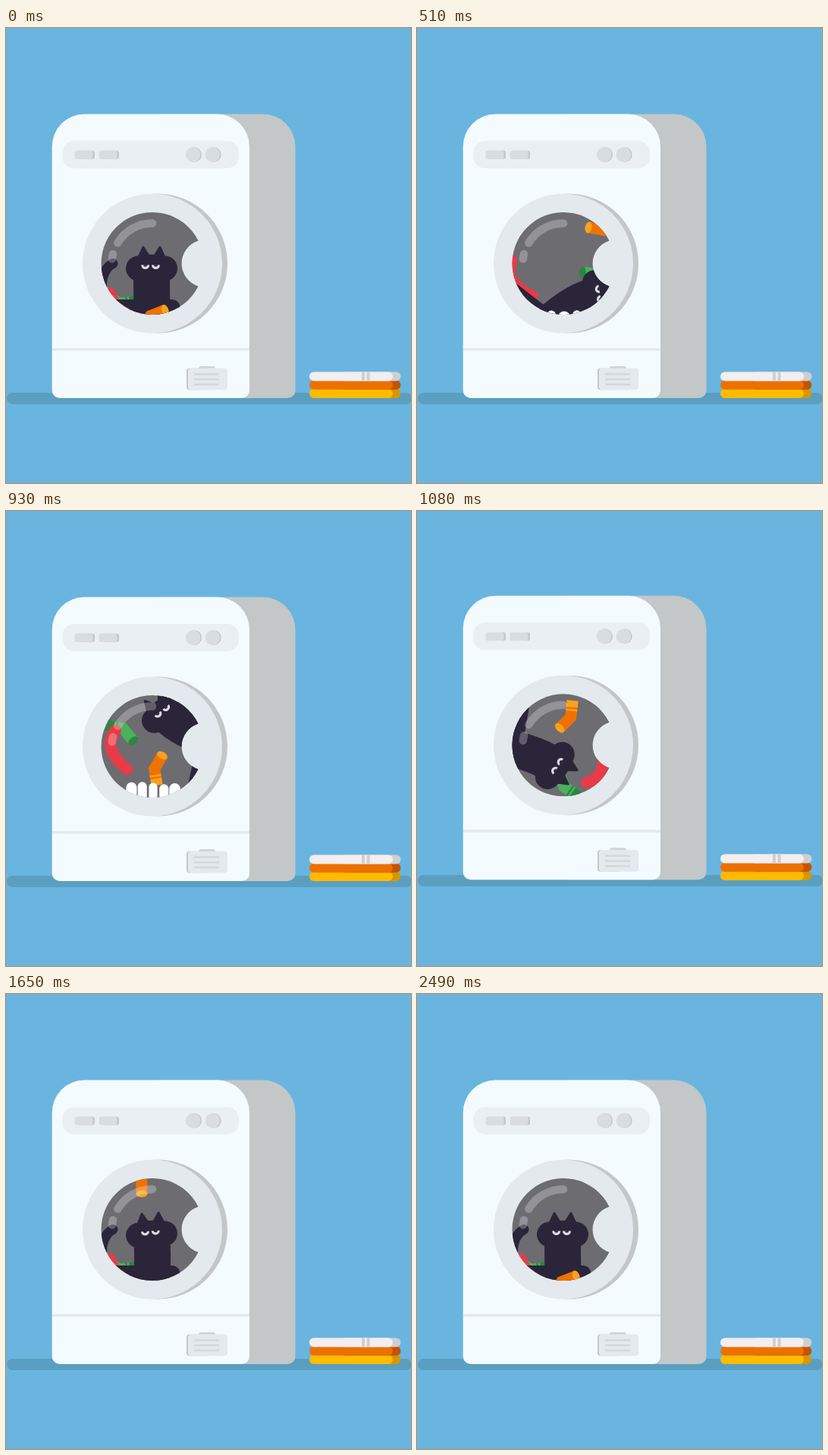
These frames come from a looping animation (534 px wide and 600 px high, 2.52 s). An HTML page:

```html
<!DOCTYPE html>
<html lang="en">
<head>
<meta charset="utf-8">
<title>Laundry day</title>
<style>
  html, body { margin: 0; width: 100%; height: 100%; overflow: hidden; background: #69b5e0; }
  svg { display: block; width: 100vw; height: 100vh; }
  .side { fill: #c4c7c8; }
  .ring { fill: #e4e9ed; }
  .knob { fill: #d9dddf; }
  .cat { fill: #2b253a; }
  .line { fill: none; stroke: #2b253a; }
  .shine { fill: none; stroke: #fff; stroke-opacity: .26; stroke-width: 10.5; stroke-linecap: round; }
</style>
</head>
<body>
<svg viewBox="0 0 534 600" preserveAspectRatio="xMidYMid meet">
  <defs>
    <clipPath id="glass">
      <path d="M253.5 280.5A67.5 67.5 0 1 0 253.5 340.5A31.5 31.5 0 0 1 253.5 280.5Z"/>
    </clipPath>
    <g id="button">
      <rect class="side" x="2" width="24.5" height="11" rx="3"/>
      <rect class="knob" width="24" height="11" rx="3"/>
    </g>
    <g id="dial">
      <circle class="side" cx="1.2" r="9.8"/>
      <circle class="knob" cx="-.3" r="9.8"/>
    </g>
    <g id="eye">
      <path fill="#dcdce4" d="M-5.5 0A5.5 5.5 0 0 0 5.5 0Z"/>
      <path class="cat" d="M-2.5 -.3A2.5 2.5 0 0 0 2.5 -.3Z"/>
    </g>
  </defs>

  <rect id="floor" x="1" y="481" width="534" height="15" rx="7.5" fill="#5a9fc0"/>

  <g id="machine">
    <path class="side" d="M200 113.5H338.5A43 43 0 0 1 381.5 156.5V478A10 10 0 0 1 371.5 488H200Z"/>
    <path fill="#f3fbff" d="M60.7 156.5A43 43 0 0 1 103.7 113.5H278A43 43 0 0 1 321 156.5V478A10 10 0 0 1 311 488H70.7A10 10 0 0 1 60.7 478Z"/>
    <rect x="74.5" y="149" width="232.5" height="36" rx="15" fill="#e9eff2"/>
    <use href="#button" x="90.5" y="161.7"/>
    <use href="#button" x="122.5" y="161.7"/>
    <use href="#dial" x="247" y="167"/>
    <use href="#dial" x="272.7" y="167"/>
    <rect class="ring" x="61" y="422" width="260" height="3.5"/>

    <rect x="254" y="446" width="22" height="8" rx="3" fill="#d0d4d6"/>
    <rect class="side" x="238" y="448.7" width="30" height="28.6" rx="4"/>
    <rect class="ring" x="240" y="448.7" width="52" height="28.6" rx="4"/>
    <path d="M248 456.5H281M248 463.3H281M248 470H281" stroke="#d3d8db" stroke-width="2.4"/>

    <circle class="side" cx="200" cy="310.5" r="92"/>
    <circle class="ring" cx="193" cy="310.5" r="92"/>

    <g clip-path="url(#glass)">
      <rect x="120" y="238" width="140" height="145" fill="#6d6c71"/>
      <g id="green"></g>
      <path id="red" d="M9 -24Q-13 -2.5 17 29" fill="none" stroke="#e93a48" stroke-width="15" stroke-linecap="round"/>
      <g id="cat">
        <path id="tail" class="line" stroke-width="13" stroke-linecap="round" d="M-65 44C-69 24 -65 7 -52 0"/>
        <path id="neck" class="line" stroke-width="48"/>
        <path id="base" class="cat" d="M-85 47.5H26A10.5 10.5 0 0 1 36.5 58V82H-85Z"/>
        <g id="head">
          <path class="cat" d="M-19 -14L-12.3 -28.5Q-11 -30.5 -9.7 -28.5L-2.5 -17H2.5L9.7 -28.5Q11 -30.5 12.3 -28.5L19 -14Z"/>
          <rect class="cat" x="-18" y="-18.3" width="36" height="35" rx="3"/>
          <circle class="cat" cx="-17.5" r="16.5"/>
          <circle class="cat" cx="17.5" r="16.5"/>
          <use href="#eye" x="-8.3" y="-4.5"/>
          <use href="#eye" x="5.5" y="-4.5"/>
        </g>
      </g>
      <g id="orange"></g>
      <g id="foam" stroke="#fff" stroke-linecap="round"></g>
      <path class="shine" d="M147.3 283.5A53 53 0 0 1 193 257.5"/>
      <path class="shine" d="M141 298A53 53 0 0 0 139.8 304.5"/>
    </g>
  </g>

  <g id="towels"></g>
</svg>

<script>
const CX = 193, CY = 310.5, LOOP = 2520, STEP = 30, SPIN = 1650, RAD = Math.PI / 180;
const $ = id => document.getElementById(id);
const place = (id, x, y, r = 0) => $(id).setAttribute('transform', `translate(${x} ${y}) rotate(${r})`);

// Drum progress: brisk start, long slow-down
function spin(t) {
  const u = Math.min(t / SPIN, 1), a = u ** 1.45;
  return a / (a + (1 - u) ** 2);
}
// Half sine from a to b, zero outside
const wave = (t, a, b) => t > a && t < b ? Math.sin(Math.PI * (t - a) / (b - a)) : 0;
const smooth = (t, a, b) => {
  const u = Math.min(Math.max((t - a) / (b - a), 0), 1);
  return u * u * (3 - 2 * u);
};
const mix = (a, b, k) => a.map((v, i) => v + (b[i] - v) * k);

// Laundry follows the drum, lags behind it and drops towards the middle
const laundry = {
  red: { angle: 124, sweep: 1440, radius: 71, lag: 230, from: 570, dip: 17, dipFrom: 570, face: -184, roll: 0, swing: 0 },
  green: { angle: 129, sweep: 1440, radius: 68, lag: 220, from: 260, dip: 28, dipFrom: 260, face: 132, roll: 0, swing: 130 },
  orange: { angle: 92, sweep: 1246, radius: 69, lag: 170, from: 260, dip: 40, dipFrom: 690, face: -62, roll: -56, swing: 0 }
};

function pose(o, t) {
  const late = wave(t, o.from, 1310);
  const a = o.angle + o.sweep * spin(t) - o.lag * late;
  const r = o.radius - o.dip * wave(t, o.dipFrom, 1230);
  const turn = a + o.face + o.roll * Math.min(t / SPIN, 1) + o.swing * late;
  return [CX + r * Math.cos(a * RAD), CY + r * Math.sin(a * RAD), turn];
}

// After the spin the orange sock lands on the head, then slides off
function orangePose(t) {
  if (t < SPIN) return pose(laundry.orange, t);
  const [x, y, turn] = pose(laundry.orange, 0);
  const landed = mix(pose(laundry.orange, SPIN), [181, 298, 1310], smooth(t, SPIN, 1830));
  return mix(landed, [x, y, turn + 1440], smooth(t, 2160, 2460));
}

function cat(t) {
  const slide = wave(t, 0, 1270), x = 65 * slide - 1, y = 6.5, out = 12 * slide;
  const tilt = 50 * wave(t, 150, 1250) - 4 * wave(t, 1400, 1900);
  place('cat', CX, CY, 1440 * spin(t));
  place('base', 0, out);
  place('head', x, y, tilt);
  $('tail').setAttribute('transform', `rotate(${-70 * Math.min(1, 3 * wave(t, 0, SPIN))} -65 44)`);
  const cx = x - 28 * Math.sin(tilt * RAD), cy = y + 28 * Math.cos(tilt * RAD);
  $('neck').setAttribute('d', `M${x} ${y}Q${cx} ${cy} ${x * .55} ${64 + out}`);
}

function random(seed) {
  const v = Math.sin(seed * 12.9898) * 43758.5453;
  return v - Math.floor(v);
}

// Four splashes, each wider and higher than the one before
function foam(t) {
  let out = '';
  for (let k = 0; k < 4; k++) {
    const push = 1 - ((t - 300 - 320 * k) / 150) ** 2, n = 1 + 2 * k;
    if (push <= 0) continue;
    for (let i = 0; i < n; i++) {
      const seed = k * 10 + i + 1;
      const x = 194 + 38 * Math.sqrt(k / 3) * (2 * (i + .5) / n - 1) * 1.15;
      const r = 5.5 + 3 * random(seed + 50) * Math.min(k, 1);
      const y = 382 - push * (15 + 3 * k + k * 3 * random(seed)) + r;
      out += `<path d="M${x} ${y}v40" stroke-width="${2 * r}"/>`;
    }
  }
  $('foam').innerHTML = out;
}

function draw(time) {
  const n = Math.floor((time % LOOP) / STEP), t = n * STEP;
  const up = t > 0 && t < SPIN && n % 2 === 0 ? 1 : 0;
  place('machine', 0, -1.7 * up);
  place('floor', 0, -up);
  place('towels', 0, -up);

  cat(t);
  place('red', ...pose(laundry.red, t));
  place('green', ...pose(laundry.green, t));
  place('orange', ...orangePose(t));
  foam(t);
}

function sock(id, main, trim) {
  $(id).innerHTML = `
    <path d="M0 21V0L13 -16" fill="none" stroke="${main}" stroke-width="15"/>
    <path d="M0 22V13M0 10.5V8" fill="none" stroke="${trim}" stroke-width="15"/>
    <ellipse cx="13" cy="-16" rx="7.5" ry="4.5" transform="rotate(40 13 -16)" fill="${trim}"/>`;
}
sock('green', '#4cb15b', '#2d8540');
sock('orange', '#ee7203', '#fba01d');

const towel = (y, main, shade) => `
  <rect x="440" y="${y}" width="80.5" height="12" rx="6" fill="${shade}"/>
  <rect x="400" y="${y}" width="110" height="12" rx="6" fill="${main}"/>`;
$('towels').innerHTML = towel(476, '#ffbb00', '#d69700') + towel(464.7, '#ec7000', '#c55300')
  + towel(453.5, '#f3eeef', '#cfcfd2')
  + '<path d="M471 453.5v12M477.7 453.5v12" stroke="#cfcfd2" stroke-width="4"/>';

const start = performance.now();
function tick() {
  draw(performance.now() - start);
  requestAnimationFrame(tick);
}
tick();
</script>
</body>
</html>
```
